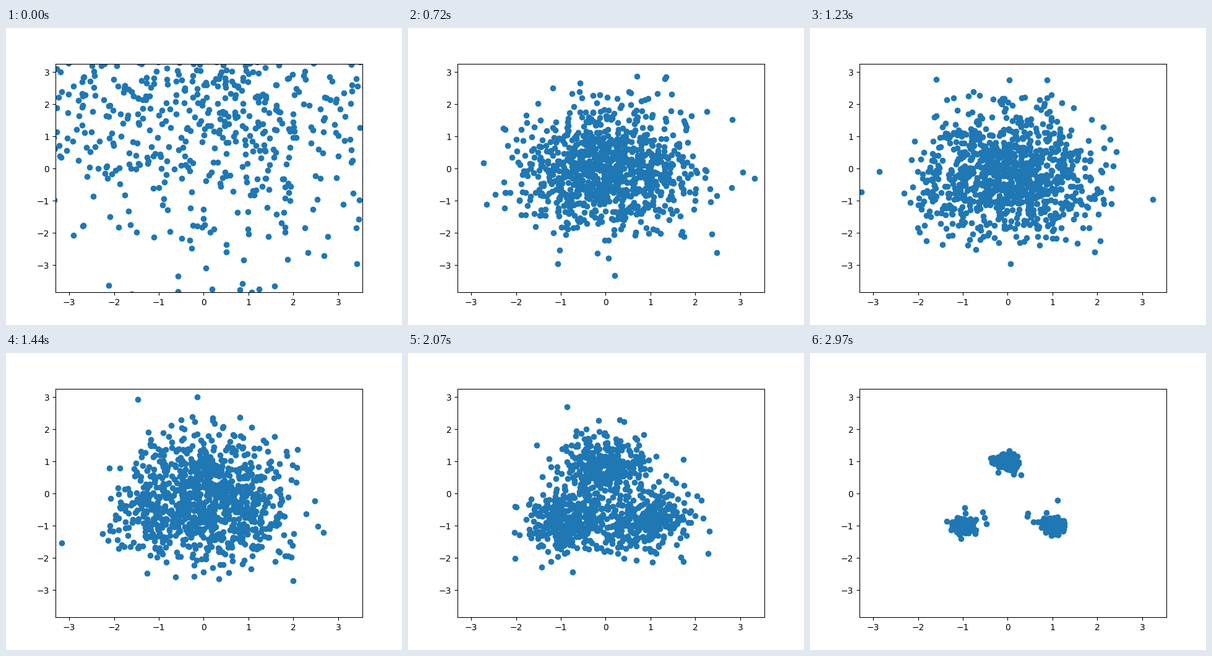
A matplotlib script that plays this animation: 640 px wide and 480 px high, repeating every 3 s.

```python
import numpy as np
import matplotlib.pyplot as plt
from matplotlib.animation import FuncAnimation

STEPS = 100
COUNT = 1000
rng = np.random.default_rng(12)

# Three tight clusters, each with a thin halo of strays towards the middle
centers = np.array([[0, 1], [-1, -1], [1, -1]], dtype=float)
means = np.vstack([centers, 0.7 * centers])
spread = np.repeat([0.115, 0.25], 3)
weights = np.repeat([0.97, 0.03], 3) / 3


def signal(step):
    """Cosine schedule: share of signal variance left at a noise step."""
    def level(u):
        return np.cos((u + 0.008) / 1.008 * np.pi / 2) ** 2
    return level(step / STEPS) / level(0)


def expected_clean(x, a):
    """Mean of the clean position given the noisy one, for the mixture."""
    var = a * spread**2 + 1 - a
    diff = x[:, None, :] - np.sqrt(a) * means
    logp = np.log(weights / var) - (diff**2).sum(axis=2) / (2 * var)
    resp = np.exp(logp - logp.max(axis=1, keepdims=True))
    resp /= resp.sum(axis=1, keepdims=True)
    gain = np.sqrt(a) * spread**2 / var
    return (resp[..., None] * (means + gain[:, None] * diff)).sum(axis=1)


def denoise(x, step):
    """One reverse diffusion step."""
    a, a_prev = signal(step), signal(step - 1)
    alpha = a / a_prev
    beta = 1 - alpha
    mean = (np.sqrt(a_prev) * beta * expected_clean(x, a)
            + np.sqrt(alpha) * (1 - a_prev) * x) / (1 - a)
    sigma = np.sqrt(beta * (1 - a_prev) / (1 - a))
    return mean + sigma * rng.standard_normal(x.shape)


# The cloud starts wide and shifted upwards
start = np.column_stack([0.1 + 2.5 * rng.standard_t(3, COUNT),
                         2.3 + 2.4 * rng.standard_t(4, COUNT)])
path = [start]
for step in range(STEPS - 1, 0, -1):
    path.append(denoise(path[-1], step))

fig, ax = plt.subplots(figsize=(6.4, 4.8), dpi=100)
dots = ax.scatter(start[:, 0], start[:, 1])
ax.set_xlim(-3.305, 3.54)
ax.set_ylim(-3.85, 3.26)
ax.set_xticks(range(-3, 4))
ax.set_yticks(range(-3, 4))


def update(i):
    dots.set_offsets(path[i])
    return (dots,)


anim = FuncAnimation(fig, update, frames=STEPS, interval=30,
                     repeat=True, repeat_delay=0)
plt.show()
```
